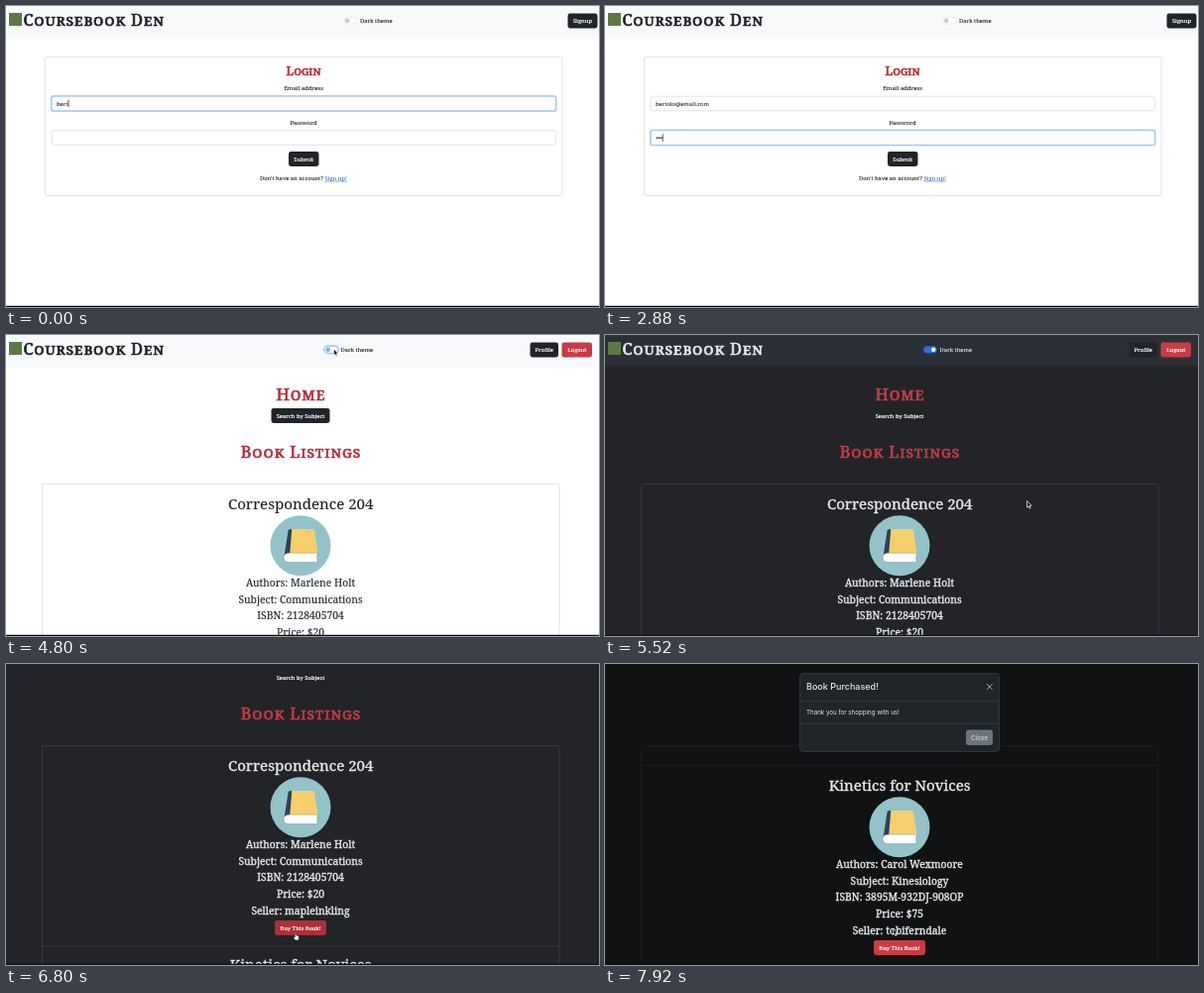
Animation of 598 by 304 pixels, one loop 8000 ms. Source, as an HTML page:

```html
<!DOCTYPE html>
<html lang="en">
<head>
<meta charset="utf-8">
<title>Book marketplace</title>
<style>
html, body { margin: 0; width: 100%; height: 100%; overflow: hidden; background: #fff; }
svg { display: block; width: 598px; height: 304px; font-family: "Noto Serif", serif;
  --bg: #fff; --fg: #1c2024; --nav: #f8f9fb; --line: #d9dcdf; --head: #b52f39; }
svg.dark { --bg: #222428; --fg: #e8eaec; --nav: #2b3037; --line: #3b3e43; --head: #c23c44; }
text { fill: var(--fg); stroke: var(--fg); stroke-width: .1px; white-space: pre; }
.bg { fill: var(--bg); }
.nav { fill: var(--nav); }
.line { fill: none; stroke: var(--line); stroke-width: .8px; }
.head { font-variant-caps: small-caps; fill: var(--head); stroke: var(--head); stroke-width: .7px; }
.brand { fill: var(--fg); stroke: var(--fg); }
.on { fill: #fff; stroke: #fff; stroke-width: .2px; }
.sans { font-family: Inter, sans-serif; fill: #e3e6e9; stroke: none; }
.dark .bold { stroke-width: .35px; }
</style>
</head>
<body>
<svg id="stage" viewBox="0 0 598 304" xmlns="http://www.w3.org/2000/svg"></svg>
<script>
const LOOP = 8000;
const stage = document.getElementById('stage');
const DARK = '#212429', RED = '#c93b45';

function add(parent, tag, attrs = {}, text) {
  const e = document.createElementNS('http://www.w3.org/2000/svg', tag);
  set(e, attrs);
  if (text) e.textContent = text;
  parent.appendChild(e);
  return e;
}
function set(e, attrs) {
  for (const k in attrs) e.setAttribute(k, attrs[k]);
}
const group = parent => add(parent, 'g');
const rect = (p, x, y, width, height, attrs) => add(p, 'rect', { x, y, width, height, ...attrs });
// y is the middle of the capitals
function label(p, x, y, size, text, cls = '', anchor = 'middle', attrs = {}) {
  return add(p, 'text', { x, y: y + size * .35, 'font-size': size, 'text-anchor': anchor, class: cls, ...attrs }, text);
}
function button(p, x, y, w, text, fill) {
  const box = rect(p, x, y, w, 15, { rx: 2.4, fill });
  label(p, x + w / 2, y + 7.5, 5.8, text, 'on');
  return box;
}
const show = (e, on) => e.setAttribute('display', on ? 'inline' : 'none');
const shift = (e, x, y) => e.setAttribute('transform', `translate(${x} ${y})`);
const span = (t, a, b) => Math.min(1, Math.max(0, (t - a) / (b - a)));
const easeOut = p => 1 - (1 - p) ** 3;
const easeInOut = p => p * p * (3 - 2 * p);
const count = (t, times) => times.filter(k => k <= t).length;

function navbar(p, x) {
  const bar = rect(p, 0, 0, 598, 33, { class: 'nav' });
  rect(p, 3, 7, 13, 13, { fill: '#5d7a45' });
  label(p, 17.5, 14, 16.4, 'Coursebook Den', 'head brand', 'start', { 'letter-spacing': .8 });
  const ring = rect(p, x - 1.5, 10, 16, 9.5, { rx: 4.7, fill: '#0d6efd', 'fill-opacity': .3 });
  const track = rect(p, x, 11.5, 13, 6.5, { rx: 3.2, 'stroke-width': .5 });
  const knob = add(p, 'circle', { cx: x + 3.3, cy: 14.75, r: 2.2 });
  label(p, x + 16, 14.8, 5.8, 'Dark theme', '', 'start');
  return { bar, ring, track, knob, x };
}
function paintToggle(n, on, focus) {
  n.ring.setAttribute('opacity', focus);
  set(n.track, { fill: on > 0 ? '#2a6fe8' : '#fff', stroke: on > 0 ? '#2a6fe8' : focus ? '#86b7fe' : '#d4d8dc' });
  set(n.knob, { cx: n.x + 3.3 + 6.4 * on, fill: on > 0 ? '#fff' : focus ? '#86a8dc' : '#c4c8cc' });
}

function field(p, y) {
  const ring = rect(p, 44.9, y - 1.1, 510.7, 17.2, { rx: 3.2, fill: '#0d6efd', 'fill-opacity': .28 });
  const box = rect(p, 46.2, y + .2, 508.1, 14.6, { rx: 2.2, fill: '#fff', 'stroke-width': .7 });
  return f => {
    ring.setAttribute('opacity', f);
    box.setAttribute('stroke', f > .5 ? '#86b7fe' : '#d5d9dd');
  };
}

// Login page
const login = group(stage);
rect(login, 0, 0, 598, 304, { fill: '#fff' });
const loginNav = navbar(login, 341);
button(login, 566.5, 7.5, 30, 'Signup', DARK);
rect(login, 39.5, 51.5, 521.5, 140, { class: 'line', rx: 1.5 });
label(login, 300, 65.5, 12.3, 'Login', 'head');
label(login, 300, 83, 5.9, 'Email address');
const emailFocus = field(login, 91);
label(login, 300, 117.5, 5.9, 'Password');
const passFocus = field(login, 125.5);
button(login, 285, 147, 30.5, 'Submit', DARK);
const ask = label(login, 300, 173.7, 5.8, "Don't have an account? ");
add(ask, 'tspan', { fill: '#1f66c9', stroke: 'none', 'text-decoration': 'underline' }, 'Sign up!');
const email = label(login, 51, 98.6, 5.8, '', '', 'start', { 'fill-opacity': .85 });
const dots = Array.from({ length: 8 }, (_, i) =>
  add(login, 'circle', { cx: 52.6 + i * 2.2, cy: 133.2, r: .85, fill: DARK }));
const caret = rect(login, 0, 0, .7, 7.5, { fill: '#111' });

// Home page
const home = group(stage);
rect(home, 0, 0, 598, 304, { class: 'bg' });
const under = group(home);
const homeNav = navbar(under, 321.5);
button(under, 528.5, 7.5, 28.5, 'Profile', DARK);
button(under, 560.5, 7.5, 30.5, 'Logout', RED);
label(under, 297.5, 60.5, 17, 'Home', 'head', 'middle', { 'letter-spacing': .8 });
const search = button(under, 267.5, 74, 59, 'Search by Subject', DARK);
label(under, 297.5, 118, 16.3, 'Book Listings', 'head', 'middle', { 'letter-spacing': .9 });
rect(under, 36.5, 150.5, 521.5, 600, { class: 'line', rx: 1.5 });
const divider = add(under, 'path', { d: 'M36.5 0H558', class: 'line' });
const backdrop = rect(home, 0, 0, 598, 304, { fill: '#000' });
const over = group(home);

function listing(title, author, subject, isbn, price, seller) {
  const g = group(over);
  label(g, 297.2, 170.3, 15.1, title, 'bold');
  add(g, 'circle', { cx: 297, cy: 212.7, r: 30.5, fill: '#93c3c9' });
  add(g, 'path', { d: 'M284.6 197.4Q285 196 289 196L287 222L280 227Z', fill: '#2b4158' });
  add(g, 'path', { d: 'M288.3 196H309Q310.7 196 311 197.6L314.6 221H286.2Z', fill: '#f5cf6c' });
  add(g, 'path', { d: 'M284.5 220.2H314.2Q313 224.8 314.2 229.6H284.5Q280 229 280 224.8T284.5 220.2Z', fill: '#fff', stroke: '#2b4158', 'stroke-width': .25 });
  ['Authors: ' + author, 'Subject: ' + subject, 'ISBN: ' + isbn, 'Price: $' + price, 'Seller: ' + seller]
    .forEach((s, i) => label(g, 297, 250.2 + i * 16.8, 10.35, s, 'bold'));
  const buy = button(g, 271, 327, 52, 'Buy This Book!', RED);
  return { g, buy };
}
const first = listing('Correspondence 204', 'Marlene Holt', 'Communications', '2128405704', 20, 'mapleinkling');
const second = listing('Kinetics for Novices', 'Carol Wexmoore', 'Kinesiology', '3895M-932DJ-908OP', 75, 'tobiferndale');

// Dialog
const modal = group(stage);
rect(modal, 196.5, 9.5, 201, 79, { rx: 3.2, fill: DARK, stroke: '#3d4247', 'stroke-width': .7 });
add(modal, 'path', { d: 'M196.5 37.8H397.5M196.5 60.2H397.5', stroke: '#3d4247', 'stroke-width': .7 });
label(modal, 203, 23.2, 9, 'Book Purchased!', 'sans', 'start', { 'font-weight': 500 });
add(modal, 'path', { d: 'M385 20.2l5.6 5.6m0 -5.6l-5.6 5.6', stroke: '#b9bcbf', 'stroke-width': .9 });
label(modal, 203, 48.7, 6.2, 'Thank you for shopping with us!', 'sans', 'start');
rect(modal, 364, 66.5, 27, 15.5, { rx: 2.4, fill: '#6c757d' });
label(modal, 377.5, 74.3, 6.3, 'Close', 'sans');

// Pointers, tip at 0,0
const ink = { fill: '#111', stroke: '#fff', 'stroke-width': .7, 'stroke-linejoin': 'round' };
const arrow = add(stage, 'path', { d: 'M0 0V6.6L1.5 5.3L2.5 7.7L3.6 7.2L2.6 4.9H4.6Z', ...ink });
const hand = add(stage, 'path', { d: 'M-.6 .4Q0 -.5 .6 .4V3L3 3.6Q3.6 4 3.4 5.4L2.8 8H-.6L-2.2 5Q-2 4 -.6 5Z', ...ink, fill: '#fff', stroke: '#111', 'stroke-width': .5 });

rect(stage, 0, 302.8, 598, 1.2, { fill: '#0c0d0e' });

const ADDRESS = 'bertolo@email.com';
const emailKeys = [80, 160, 240, 320, 560, 640, 720, 880, 1040, 1200, 1440, 1680, 1760];
const passKeys = [2480, 2600, 2720, 2960, 3160, 3360, 3560, 4030];
const HOME = 4720, TOGGLE = 4860, CLICK = 7350, REMOVE = 7520;

function drawLogin(t) {
  const f = span(t, 1900, 2050), inPass = t >= 1900;
  emailFocus(1 - f);
  passFocus(f);
  email.textContent = ADDRESS.slice(0, 4 + count(t, emailKeys));
  const n = count(t, passKeys);
  dots.forEach((d, i) => show(d, i < n));
  const keys = inPass ? [1900, ...passKeys] : [0, ...emailKeys];
  const idle = t - keys[count(t, keys) - 1];
  show(caret, idle % 1060 < 530);
  set(caret, inPass
    ? { x: 51.2 + n * 2.2, y: 129.3 }
    : { x: 51.2 + email.getComputedTextLength(), y: 94.6 });
  paintToggle(loginNav, 0, 0);
}

function drawHome(t) {
  const dark = t >= TOGGLE;
  homeNav.bar.setAttribute('height', dark ? 31 : 33);
  search.setAttribute('fill', dark ? '#222428' : DARK);
  paintToggle(homeNav, dark ? span(t, TOGGLE, TOGGLE + 150) : 0, t < 4740 ? 0 : 1 - span(t, 5200, 5350));

  const y = -68 * easeOut(span(t, 5540, 5940));
  const sold = t >= REMOVE;
  shift(under, 0, y);
  shift(over, 0, y);
  shift(divider, 0, sold ? 170.5 : 353);
  show(first.g, !sold);
  shift(second.g, 0, sold ? 20 : 201.5);

  const a = easeInOut(span(t, 5080, 5480)), b = easeInOut(span(t, 5960, 6420));
  const px = 330.5 + 95 * a - 133.5 * b, py = 14 + 153.5 * a + 103.5 * b;
  const hover = t > 6300 && t < REMOVE;
  first.buy.setAttribute('fill', hover ? '#ab3039' : RED);
  show(arrow, !hover);
  show(hand, hover);
  shift(arrow, px - 1.5 * b, py - 4 * b);
  shift(hand, px, py);

  backdrop.setAttribute('opacity', .5 * span(t, CLICK, CLICK + 150));
  const m = span(t, CLICK + 60, CLICK + 360);
  modal.setAttribute('opacity', m);
  shift(modal, 0, -20 * (1 - easeOut(m)));
}

function draw(t) {
  const atHome = t >= HOME;
  stage.classList.toggle('dark', t >= TOGGLE);
  show(login, !atHome);
  show(home, atHome);
  show(modal, t >= CLICK);
  show(arrow, false);
  show(hand, false);
  if (atHome) drawHome(t); else drawLogin(t);
}

const start = performance.now();
function tick() {
  draw((performance.now() - start) % LOOP);
  requestAnimationFrame(tick);
}
tick();
</script>
</body>
</html>
```
